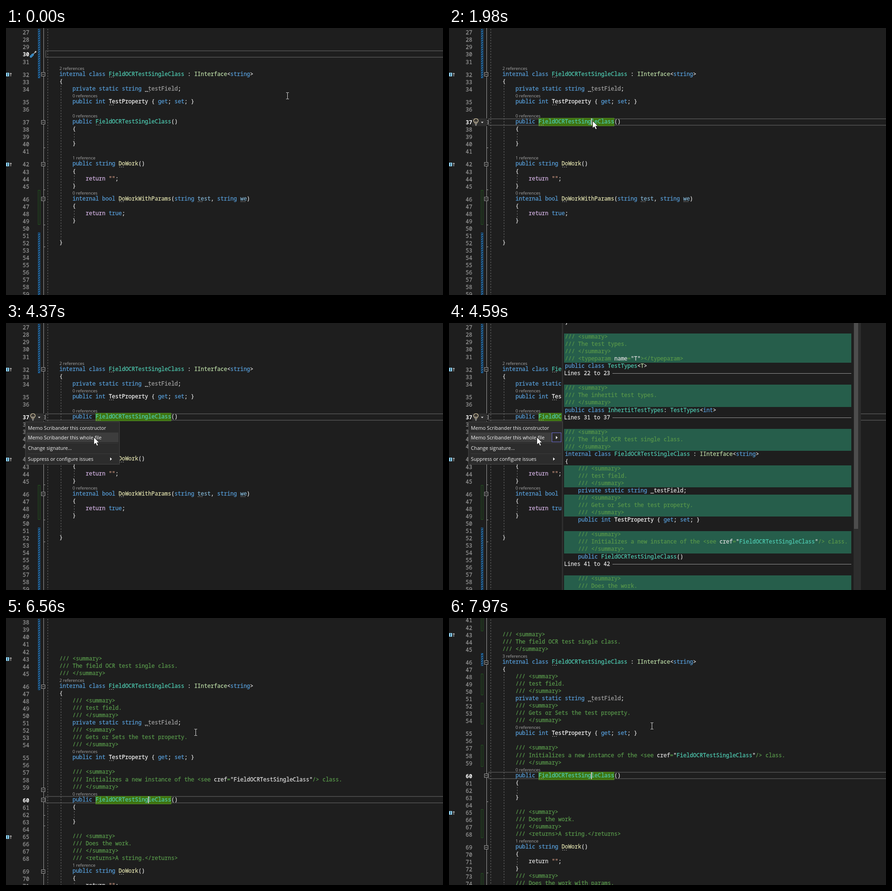
Recreate the animation shown at these times as an HTML page. Size 957 px wide and 585 px high, loop 8000 ms.

```html
<!DOCTYPE html>
<html lang="en">
<head>
<meta charset="utf-8">
<title>Editor quick actions</title>
<style>
html, body { margin: 0; width: 100%; height: 100%; overflow: hidden; background: #1e1e1e }
svg { display: block; width: 957px; height: 585px; overflow: hidden }
rect, line { shape-rendering: crispEdges }
text { font: 500 12px "Noto Sans Mono", "DejaVu Sans Mono", monospace; color: #dcdcdc; white-space: pre }
text, tspan { fill: currentColor; stroke: currentColor; stroke-width: .3px }
.num { color: #929292; text-anchor: end }
.num.cur { color: #fff; font-weight: 700; stroke: none }
.lens { font: 9.5px "Open Sans", sans-serif; color: #a8a8a8; stroke: none }
.item { font: 10.75px "Open Sans", sans-serif; color: #f4f4f4; stroke: none }
.k { color: #569cd6 } .r { color: #d0b0e0 } .c { color: #4ec9b0 } .i { color: #b8d7a3 }
.m { color: #dcdcaa } .d { color: #a0a0a0 } .p { color: #7fb0cf } .s { color: #d69d85 }
.w { color: #f2f2f2 } .doc { color: #57964a } .attr { color: #dcdcdc }
#b .r, #panel .d { color: #dcdcdc }
#saved .ref, #panel .ref { color: #4ec9b0 }
.guide { stroke: #707070; stroke-dasharray: 3 3 }
.rail { stroke: #a0a0a0; fill: #1e1e1e }
.dots { stroke: #b0b0b0; stroke-width: 1.5; stroke-dasharray: 2 2 }
.row { fill: none; stroke: #464646; stroke-width: 2 }
</style>
</head>
<body>
<svg id="stage" viewBox="0 0 957 585"></svg>
<script>
const CW = 7.2, LH = 16.05, LENS = 12.1, X0 = 88.1;

const before = `




2 references|    internal class ~FieldOCRTestSingleClass : IInterface<string>
    {
        private static string ~_testField;
0 references|        public int ~TestProperty { get; set; }

0 references|        public ~FieldOCRTestSingleClass()
        {

        }

1 reference|        public string ~DoWork()
        {
            return "";
        }
0 references|        internal bool ~DoWorkWithParams(string ~test, string ~we)
        {
            return true;
        }


    }






`;

const after = `




    /// <summary>
    /// The field OCR test single class.
    /// </summary>
2 references|    internal class ~FieldOCRTestSingleClass : IInterface<string>
    {
        /// <summary>
        /// test field.
        /// </summary>
        private static string ~_testField;
        /// <summary>
        /// Gets or Sets the test property.
        /// </summary>
0 references|        public int ~TestProperty { get; set; }

        /// <summary>
        /// Initializes a new instance of the <see cref="FieldOCRTestSingleClass"/> class.
        /// </summary>
0 references|        public ~FieldOCRTestSingleClass()
        {

        }

        /// <summary>
        /// Does the work.
        /// </summary>
        /// <returns>A string.</returns>
1 reference|        public string ~DoWork()
        {
            return "";
        }
        /// <summary>
        /// Does the work with params.
        /// </summary>`;

const preview = `}

/// <summary>
/// The test types.
/// </summary>
/// <typeparam name="T"></typeparam>
public class TestTypes<T>
Lines 22 to 23

/// <summary>
/// The inhertit test types.
/// </summary>
public class InhertitTestTypes: TestTypes<int>
Lines 31 to 37

/// <summary>
/// The field OCR test single class.
/// </summary>
internal class FieldOCRTestSingleClass : IInterface<string>
{
    /// <summary>
    /// test field.
    /// </summary>
    private static string _testField;
    /// <summary>
    /// Gets or Sets the test property.
    /// </summary>
    public int TestProperty { get; set; }

    /// <summary>
    /// Initializes a new instance of the <see cref="FieldOCRTestSingleClass"/> class.
    /// </summary>
    public FieldOCRTestSingleClass()
Lines 41 to 42

    /// <summary>
    /// Does the work.`;

const kinds = [
  ['k', /^(internal|class|private|static|string|public|int|get|set|bool|true)$/],
  ['r', /^return$/],
  ['c', /^(FieldOCRTestSingleClass|InhertitTestTypes|TestTypes)$/],
  ['i', /^(IInterface|T)$/],
  ['m', /^DoWork/],
  ['d', /^_testField$/],
  ['p', /^(test|we)$/],
  ['w', /^TestProperty$/],
  ['s', /^"/]
];

const esc = s => s.replace(/</g, '&lt;');
const span = (cls, s) => `<tspan class="${cls}">${s}</tspan>`;
const text = (x, y, s, cls = '') => `<text x="${x}" y="${Math.round(y)}" class="${cls}">${s}</text>`;
const line = (x1, y1, x2, y2, cls) => `<line x1="${x1}" y1="${y1}" x2="${x2}" y2="${y2}" class="${cls}"/>`;
const rect = (x, y, w, h, attrs) => `<rect x="${x}" y="${y}" width="${w}" height="${h}" ${attrs}/>`;
const group = (id, s) => `<g id="${id}">${s}</g>`;

function paint(s) {
  if (s.startsWith('///')) {
    return span('doc', esc(s).replace(/(name|cref)="(\w+)"/, (m, attr, value) =>
      span('attr', attr) + '=' + span('attr', `"${value.length > 1 ? span('ref', value) : value}"`)));
  }
  return s.replace(/"[^"]*"|\w+|[^\w"]+/g, tok => {
    const kind = kinds.find(k => k[1].test(tok));
    return kind ? span(kind[0], esc(tok)) : esc(tok);
  });
}

// Editor page: numbers, margin bars, folds, guides and code
function page(src, start, { bars, icons, cur }) {
  const rows = src.split('\n').map((s, i) => {
    const [lens, code] = s.includes('|') ? s.split('|') : ['', s];
    return { lens, code: code.trim(), indent: code.search(/\S|$/), n: start + i };
  });
  let y = 10;
  rows.forEach((r, i) => { y += (i ? LH : 0) + (r.lens ? LENS : 0); r.y = y; });
  const row = n => rows[n - start];
  let out = line(82.5, -10, 82.5, 650, 'rail') + line(91.5, -10, 91.5, 650, 'guide');
  const open = [];

  for (const [a, b, kind] of bars) {
    const top = Math.round(row(a).y - 8 - (row(a).lens ? LENS : 0)) + .5, h = Math.round(row(b).y + 7 - top);
    out += rect(70.5, top, 4, h, kind == 'blue' ? 'fill="url(#hatch)" stroke="#185a92"' : 'fill="#1e1e1e" stroke="#22571f"');
  }
  const guide = (r, end) => {
    const x = Math.floor(X0 + r.indent * CW + 3.6) + .5;
    return line(x, r.y + 8, x, end, 'guide');
  };
  rows.forEach((r, i) => {
    const x = X0 + r.indent * CW, c = r.y;
    out += text(51, c + 4.3, r.n, `num n${r.n}${r.n == cur ? ' cur' : ''}`);
    if (r.lens) out += text(x, c - 10.8, r.lens, 'lens');
    if (rows[i + 1]?.code == '{') out += fold(c);
    if (r.code == '{') open.push(r);
    if (r.code == '}') out += guide(open.pop(), c - 8) + line(83, c + 7.5, 86, c + 7.5, 'rail');
    if (!r.code) return;
    out += text(x, c + 2.3, paint(r.code.replace(/~/g, '')));
    r.code.split('~').slice(0, -1).reduce((n, part) => {
      const dx = x + (n + part.length) * CW, dy = Math.round(c + 5) + .5;
      out += line(dx + 1, dy, dx + 11, dy, 'dots');
      return n + part.length;
    }, 0);
  });
  open.forEach(r => out += guide(r, 650));
  icons.forEach(n => {
    const c = Math.round(row(n).y);
    out += rect(0, c - 4, 7, 8, 'fill="#8fd0ee"') +
      `<path d="M2 ${c - 2}h3M3.5 ${c - 2}v4M2 ${c + 2}h3" stroke="#17455c"/>` +
      `<path d="M10.5 ${c + 4}v-7M8.5 ${c - 1}l2-2.5 2 2.5" fill="none" stroke="#d8d8d8"/>`;
  });
  return out;
}

function fold(c) {
  const y = Math.round(c) - .5;
  return rect(77.5, y - 4, 8, 8, 'class="rail"') + line(79, y, 84, y, 'rail');
}

const rowBox = (id, c) => group(id, rect(87, Math.round(c - 8), 900, 14, 'class="row"'));
const mark = (id, c) => group(id, rect(196.5, Math.floor(c - 9) + .5, 165, 17, 'fill="#3f740f" stroke="#4f8426"'));
const caret = (id, c) => group(id, rect(311, Math.floor(c - 8), 2, 15, 'fill="#c8c8c8"'));

function panel() {
  let out = rect(247.5, -1, 654, 588, 'fill="#1e1e1e" stroke="#3a3a3a"') + rect(247, 0, 3, 585, 'fill="#2e2e2e"') +
    rect(886, 0, 16, 585, 'fill="#2d2d2d"') + rect(887, 0, 9, 451, 'fill="#4d4d4d"');
  preview.split('\n').forEach((s, i) => {
    const c = -2.1 + i * LH, code = s.trim(), top = Math.round(c - 7);
    if (code.startsWith('///')) out += rect(252, top, 629, Math.round(c - 7 + LH) - top, 'fill="#265e4b"');
    if (code.startsWith('Lines')) {
      out += text(252, c + 4, code) + rect(358, Math.round(c), 523, 1, 'fill="#969696"');
    } else if (code) out += text(254 + s.search(/\S/) * CW, c + 4, paint(code));
  });
  return out;
}

const tri = (x, y) => `<path d="M${x} ${y - 3.5}l4 3.5-4 3.5z" fill="#f0f0f0"/>`;
const menu = rect(42.5, 216.5, 206, 93, 'fill="#2c2c2c" stroke="#444"') +
  group('hover', rect(45, 240, 201, 21, 'fill="#3d3d3d"')) +
  rect(48, 263, 197, 1, 'fill="#383838"') + rect(48, 286, 197, 1, 'fill="#3a3a3a"') +
  ['Memo Scribander this constructor', 'Memo Scribander this whole file', 'Change signature...', 'Suppress or configure issues']
    .map((s, i) => text(48, [234, 255, 278, 302][i], s, 'item')).join('') + tri(228, 298);

const bulb = rect(50, 198, 33, 17, 'fill="#2d2d2d"') +
  '<path d="M57 209v-1.5q-3-2-3-4.5a5 4.5 0 0 1 10 0q0 2.5-3 4.5v1.5z" fill="#3a3630" stroke="#e6d8b4" stroke-width="1.2"/>' +
  '<path d="M57 211.5h4M58 213.5h2M59 208v-4" stroke="#e0e0e0"/><path d="M70 205.5h5.5l-2.75 3z" fill="#e0e0e0"/>';

const driver = '<path d="M59 58l6-6" stroke="#b8b8b8" stroke-width="1.5"/><path d="M63.5 53.5l2.5-2.5" stroke="#ccc" stroke-width="3"/>' +
  '<path d="M54.5 62.5l4-4" stroke="#3e93cf" stroke-width="5" stroke-linecap="round"/><path d="M54 63l4.5-4.5" stroke="#1e4e74"/>';

const beam = 'M-2.5-6.5h2.500l.5.5.5-.5h2.500M.5-6v13M-2.500 7.500h2.500l.5-.5.5.5h2.500';
const stage = document.getElementById('stage');
stage.innerHTML = `<defs><pattern id="hatch" width="5" height="5" patternUnits="userSpaceOnUse">
  <rect width="5" height="5" fill="#1b2630"/><path d="M-1 6L6-1M-1 1L1-1M4 6L6 4" stroke="#2b8ad6" stroke-width="1.3"/></pattern></defs>` +
  group('a', rowBox('row30', 58.2) + rowBox('row37', 206.8) + mark('markA', 206.8) +
    page(before, 27, { bars: [[27, 32, 'blue'], [46, 49, 'green'], [51, 59, 'blue']], icons: [32, 42] }) +
    caret('caretA', 206.8) + group('driver', driver)) +
  group('b', rowBox('row60', 399.4) + mark('markB', 399.4) +
    group('fresh', page(after, 38, { bars: [[38, 46, 'blue']], icons: [43, 65], cur: 60 }) +
      fold(376.5) + line(83, 432.5, 86, 432.5, 'rail')) +
    group('saved', page(after.replace('2 ref', '3 ref'), 38, {
      bars: [[38, 42, 'green'], [46, 46, 'blue'], [48, 50, 'green'], [52, 54, 'green'], [57, 59, 'green'], [65, 68, 'green'], [73, 75, 'green']],
      icons: [43, 65], cur: 60 })) +
    caret('caretB', 399.4)) +
  group('panel', panel()) + group('bulb', bulb) + group('menu', menu) +
  group('more', rect(225.5, 240.5, 20, 20, 'fill="#2c2c2c" stroke="#6a6ad0"') + tri(234, 251)) +
  group('pointer', group('ibeam', `<path d="${beam}" fill="none" stroke="#e0e0e0"/>`) +
    group('arrow', '<path d="M.5.5v16l3.8-3.5 2.7 6 2.8-1.2-2.7-5.8h5z" fill="#fff" stroke="#111" stroke-width=".8"/>'));

const el = id => document.getElementById(id);
const show = (id, on) => el(id).style.display = on ? '' : 'none';
const ramp = (t, a, b) => Math.min(1, Math.max(0, (t - a) / (b - a)));
const ease = k => k * k * (3 - 2 * k);
const within = (t, a, b) => t >= a && t < b;

// time, x, y
const path = [[30, 616, 148], [380, 317, 205], [1699, 317, 205], [1700, 314, 203], [2720, 314, 203],
  [3110, 192, 250], [6320, 192, 250], [6560, 415, 250], [6990, 415, 250], [7260, 444, 236]];

function pointerAt(t) {
  let [, x, y] = path[0];
  for (let i = 1; i < path.length; i++) {
    const [t0, x0, y0] = path[i - 1], [t1, x1, y1] = path[i];
    if (t < t0) break;
    const k = ease(ramp(t, t0, t1));
    x = x0 + (x1 - x0) * k;
    y = y0 + (y1 - y0) * k;
  }
  return [Math.round(x), Math.round(y)];
}

function draw(now) {
  const t = now % 8000, clicked = t >= 660, [x, y] = pointerAt(t);
  show('a', t < 6320);
  show('row30', !clicked);
  show('driver', !clicked);
  show('row37', clicked);
  document.querySelector('#a .n30').classList.toggle('cur', !clicked);
  document.querySelector('#a .n37').classList.toggle('cur', clicked);
  el('markA').style.opacity = ramp(t, 1345, 1390);
  show('caretA', within(t, 840, 2160) || t >= 6100);

  show('b', t >= 6320);
  show('fresh', t < 7510);
  show('saved', t >= 7510);
  show('markB', !within(t, 7510, 7970));
  show('caretB', !within(t, 6630, 7160));
  el('b').setAttribute('transform', `translate(0 ${-Math.round(53 * ease(ramp(t, 7480, 7630)))})`);

  show('bulb', within(t, 1890, 5730));
  show('menu', within(t, 2040, 5730));
  el('menu').style.opacity = ramp(t, 2000, 2160);
  show('hover', x < 246 && y > 238);
  show('panel', within(t, 4590, 5730));
  show('more', within(t, 4590, 5730));

  const arrow = within(t, 1700, 6400);
  show('arrow', arrow);
  show('ibeam', !arrow);
  el('pointer').setAttribute('transform', `translate(${x} ${y})`);
}

function loop() {
  draw(performance.now());
  requestAnimationFrame(loop);
}
loop();
</script>
</body>
</html>
```
